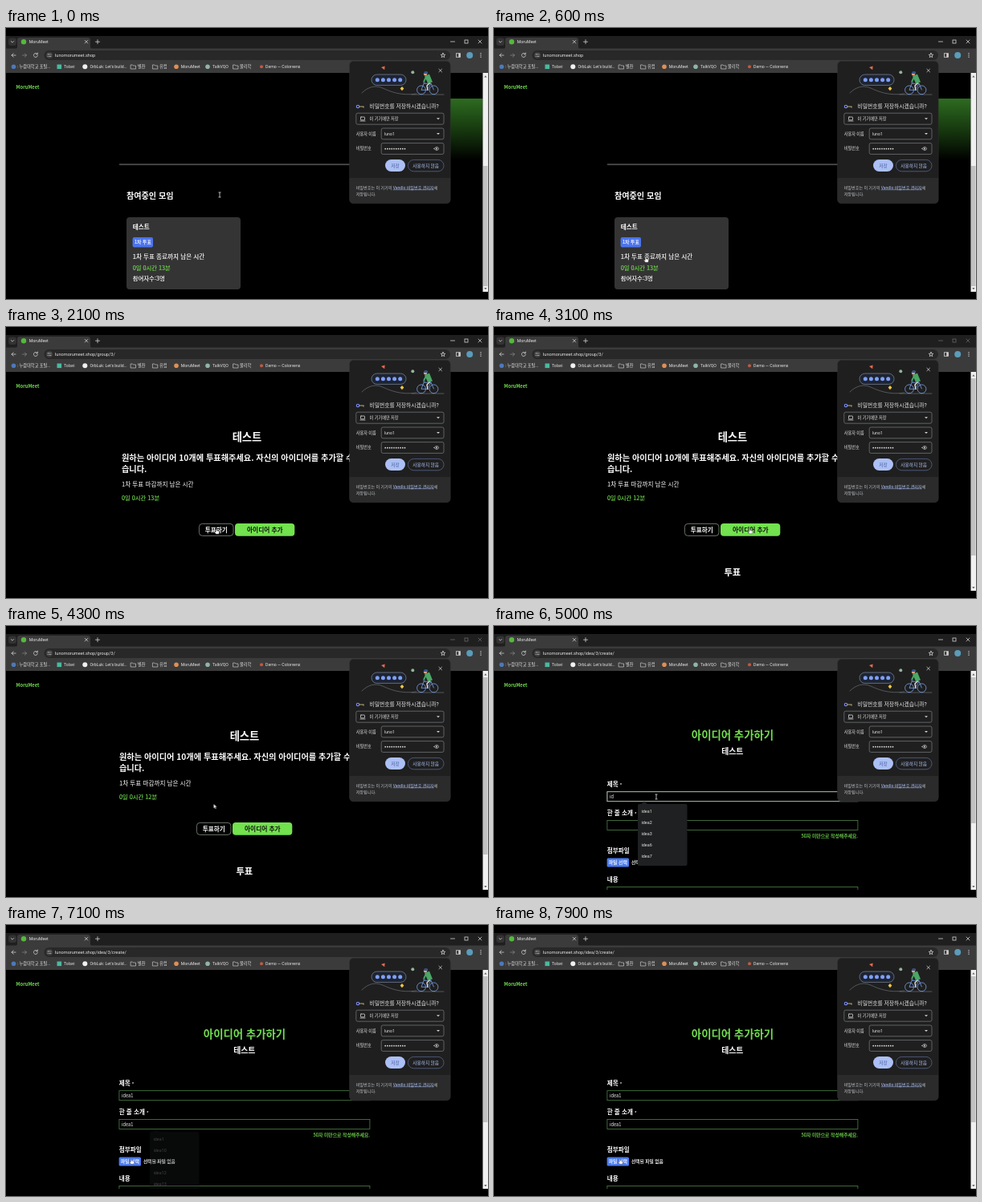
Animation, 600 px wide and 338 px high, one loop 8000 ms. Source, as an HTML page:

```html
<!DOCTYPE html>
<html lang="ko">
<head>
<meta charset="utf-8">
<title>MoruMeet</title>
<style>
html, body { margin: 0; width: 100%; height: 100%; overflow: hidden; background: #000; }
svg { display: block; width: 100vw; height: 100vh; }
text { font-family: "Noto Sans CJK KR", "Noto Sans CJK", "Noto Sans", sans-serif; fill: #fff; white-space: pre; }
.ui text, .latin { font-family: Roboto, "Noto Sans CJK KR", "Noto Sans CJK", sans-serif; fill: #e3e3e3; }
.page text { stroke: #fff; stroke-width: .15; }
.page .g { fill: #72dd50; stroke: #72dd50; }
.page .b, .page .t1, .page .t2, .page .latin { stroke: none; }
.b { font-weight: 700; }
.mid { text-anchor: middle; }
.line { fill: none; stroke: #d0d0d0; stroke-width: .8; stroke-linecap: round; }
.box { fill: none; stroke: #7c7e81; stroke-width: .7; }
.field { fill: #000; stroke: #4f8248; stroke-width: .8; }
.focus { fill: none; stroke: #b4b4b4; stroke-width: .9; }
.list { fill: #1f2021; }
.thumb { fill: #c1c1c1; }

/* One 8 s loop; every rule below shares it. */
.home, .group, .vote, .create, .dim, .bright, .title-on, .title-list, .intro-on, .intro-list,
.caret, .all, .match, .cursor, .beam, .arrow, .hand, .t1 tspan, .t2 tspan {
  animation: 8s infinite step-end backwards;
}
.home { animation-name: home; }
.group { animation-name: group; }
.vote, .dim { animation-name: vote; }
.create { animation-name: create; }
.bright { animation-name: bright; }
.title-on { animation-name: title-on; }
.title-list { animation-name: title-list; }
.intro-on { animation-name: intro-on; }
.intro-list { animation-name: intro-list; animation-timing-function: linear; }
.caret { animation-name: caret; }
.all { animation-name: all; }
.match { animation-name: match; }
.t1 tspan { animation-name: type1; }
.t2 tspan { animation-name: type2; }
tspan:nth-child(2) { animation-delay: .08s; }
tspan:nth-child(3) { animation-delay: .16s; }
tspan:nth-child(4) { animation-delay: .24s; }
tspan:nth-child(5) { animation-delay: .32s; }
.cursor { animation-name: move; animation-timing-function: ease-in-out; }
.beam { animation-name: beam; }
.arrow { animation-name: arrow; }
.hand { animation-name: hand; }

@keyframes home { 0% { visibility: visible } 8.75%, 100% { visibility: hidden } }
@keyframes group { 0% { visibility: hidden } 8.75% { visibility: visible } 28.75%, 100% { visibility: hidden } }
@keyframes vote { 0% { visibility: hidden } 28.75% { visibility: visible } 56.25%, 100% { visibility: hidden } }
@keyframes create { 0% { visibility: hidden } 56.25%, 100% { visibility: visible } }
@keyframes bright { 0% { visibility: visible } 28.75% { visibility: hidden } 56.25%, 100% { visibility: visible } }
@keyframes title-on { 0% { opacity: 0 } 59.4% { opacity: 1 } 70%, 100% { opacity: 0 } }
@keyframes title-list { 0% { opacity: 0 } 60% { opacity: 1 } 67%, 100% { opacity: 0 } }
@keyframes intro-on { 0% { opacity: 0 } 70% { opacity: 1 } 88%, 100% { opacity: 0 } }
@keyframes intro-list { 0%, 70.5% { opacity: 0 } 70.6%, 87.4% { opacity: 1 } 89.3%, 100% { opacity: 0 } }
@keyframes caret { 0% { opacity: 0 } 70% { opacity: 1 } 77.5%, 100% { opacity: 0 } }
@keyframes all { 0% { opacity: 1 } 81.5%, 100% { opacity: 0 } }
@keyframes match { 0% { opacity: 0 } 81.5%, 100% { opacity: 1 } }
@keyframes type1 { 0% { fill-opacity: 0 } 61.5%, 100% { fill-opacity: 1 } }
@keyframes type2 { 0% { fill-opacity: 0 } 77.5%, 100% { fill-opacity: 1 } }
@keyframes move {
  0%, 1.25% { transform: translate(266px, 208px) }
  6.25%, 17.5% { transform: translate(189px, 287px) }
  24%, 31% { transform: translate(262px, 253px) }
  36%, 46% { transform: translate(318.5px, 252.5px) }
  51%, 54% { transform: translate(258.5px, 222px) }
  56%, 56.5% { transform: translate(306px, 252px) }
  59%, 67.5% { transform: translate(202px, 213px) }
  70%, 83.5% { transform: translate(202.5px, 250.5px) }
  87.5% { transform: translate(156px, 293px) }
  97%, 100% { transform: translate(157px, 293px) }
}
@keyframes beam { 0% { visibility: visible } 4% { visibility: hidden } 58.5% { visibility: visible } 85.5%, 100% { visibility: hidden } }
@keyframes arrow {
  0% { visibility: hidden } 8.75% { visibility: visible } 23% { visibility: hidden }
  31.5% { visibility: visible } 35% { visibility: hidden } 48% { visibility: visible }
  55.6% { visibility: hidden } 56.6% { visibility: visible } 58.5%, 100% { visibility: hidden }
}
@keyframes hand {
  0% { visibility: hidden } 4% { visibility: visible } 8.75% { visibility: hidden }
  23% { visibility: visible } 31.5% { visibility: hidden } 35% { visibility: visible }
  48% { visibility: hidden } 55.6% { visibility: visible } 56.6% { visibility: hidden }
  85.5%, 100% { visibility: visible }
}
</style>
</head>
<body>
<svg viewBox="0 0 600 338" preserveAspectRatio="none">
  <defs>
    <linearGradient id="glow" x1="0" y1="0" x2="0" y2="1">
      <stop offset="0" stop-color="#2d6b20"/><stop offset=".5" stop-color="#17390f"/><stop offset="1" stop-color="#000"/>
    </linearGradient>
    <clipPath id="view"><rect y="56" width="600" height="273"/></clipPath>
    <path id="folder" class="line" style="stroke-width:.65" d="M-3-2h2l1 1h3v4h-6z"/>
    <path id="down" d="M-2-1h4l-2 2z" fill="#d5d5d5"/>
    <path id="x" class="line" d="M-1.8-1.8l3.6 3.6m0-3.6l-3.6 3.6"/>
    <g id="controls">
      <path class="line" d="M553.5 17h5M588 15l4 4m0-4l-4 4"/>
      <rect class="line" x="571" y="15" width="4" height="4"/>
    </g>
    <g id="track">
      <rect x="593.5" y="56" width="6.5" height="273" fill="#f0f0f0"/>
      <path d="M595.2 61.5h3.4l-1.7-2.2zM595.2 324h3.4l-1.7 2.2z" fill="#606060"/>
    </g>
    <g id="vote-head">
      <text class="g b mid" x="297" y="141.5" font-size="13.3">테스트</text>
      <text class="b" x="141" y="166.5" font-size="10.2">원하는 아이디어 10개에 투표해주세요. 자신의 아이디어를 추가할 수도 있</text>
      <text class="b" x="141" y="181" font-size="10.2">습니다.</text>
      <text x="141" y="199" font-size="7.6">1차 투표 마감까지 남은 시간</text>
      <rect x="237.4" y="245.4" width="42.6" height="15" rx="4" fill="#000" stroke="#829080" stroke-width=".8"/>
      <text class="g b mid" x="258.8" y="255.7" font-size="7.6">투표하기</text>
      <rect x="282" y="245" width="74.3" height="15.8" rx="4" fill="#72e24e"/>
      <text class="b mid" x="319.3" y="255.8" font-size="7.7" style="fill:#101510">아이디어 추가</text>
    </g>
  </defs>

  <rect width="600" height="338"/>

  <g class="page" clip-path="url(#view)">
    <g class="home">
      <rect x="440" y="88" width="153.5" height="77" fill="url(#glow)"/>
      <rect x="141" y="169.3" width="312" height="1.8" fill="#4b4b4b"/>
      <text class="b" x="150" y="213.3" font-size="10.1">참여중인 모임</text>
      <rect x="150" y="236" width="142" height="90" rx="4" fill="#343434"/>
      <text class="b" x="157.7" y="251" font-size="7.6">테스트</text>
      <rect x="157.6" y="261" width="25.4" height="12.4" rx="2" fill="#4b74ee"/>
      <text class="mid" x="170.3" y="269.3" font-size="5.8">1차 투표</text>
      <text x="157.7" y="288.3" font-size="7.6">1차 투표 종료까지 남은 시간</text>
      <text class="g" x="157.7" y="301.8" font-size="7.3">0일 0시간 13분</text>
      <text x="157.7" y="315.3" font-size="7.4">참여자수:3명</text>
      <use href="#track"/><rect class="thumb" x="594" y="172" width="5.5" height="150"/>
    </g>

    <g class="group" transform="translate(3)">
      <use href="#vote-head"/>
      <text class="g" x="141" y="216.3" font-size="7.3">0일 0시간 13분</text>
    </g>

    <g class="vote">
      <use href="#vote-head"/>
      <text class="g" x="141" y="216.3" font-size="7.3">0일 0시간 12분</text>
      <text class="b mid" x="296.8" y="310.2" font-size="11.3">투표</text>
      <use href="#track"/><rect class="thumb" x="594" y="64" width="5.5" height="221"/>
    </g>

    <g class="create">
      <text class="g b mid" x="297" y="141.3" font-size="13.4">아이디어 추가하기</text>
      <text class="b mid" x="296.8" y="159.6" font-size="9.9">테스트</text>
      <g font-size="7.6">
        <text class="b" x="140.7" y="200.3">제목 <tspan font-size="5">*</tspan></text>
        <text class="b" x="140.7" y="236.2">한 줄 소개 <tspan font-size="5">*</tspan></text>
        <text class="b" x="140.7" y="283.3">첨부파일</text>
        <text class="b" x="140.7" y="319">내용</text>
      </g>
      <rect class="field" x="140.9" y="206.7" width="312" height="12"/>
      <rect class="field" x="140.9" y="242.5" width="312" height="12"/>
      <rect class="field" x="140.9" y="325.4" width="312" height="30"/>
      <rect class="focus title-on" x="140.9" y="206.7" width="312" height="12"/>
      <rect class="focus intro-on" x="140.9" y="242.5" width="312" height="12"/>
      <path class="caret" d="M144.3 245.5v6" stroke="#ddd" stroke-width=".6"/>
      <text class="t1" x="144" y="214.8" font-size="5.6"><tspan>i</tspan><tspan>d</tspan><tspan>e</tspan><tspan>a</tspan><tspan>1</tspan></text>
      <text class="t2" x="144" y="250.6" font-size="5.6"><tspan>i</tspan><tspan>d</tspan><tspan>e</tspan><tspan>a</tspan><tspan>1</tspan></text>
      <text class="g" x="453" y="264.2" font-size="5.85" text-anchor="end">50자 미만으로 작성해주세요.</text>
      <rect x="140.6" y="289.5" width="27.4" height="11" rx="1.5" fill="#4a7bf0"/>
      <text class="mid" x="154.3" y="297.2" font-size="5.9">파일 선택</text>
      <text x="171" y="297.2" font-size="5.7">선택된 파일 없음</text>
      <use href="#track"/><rect class="thumb" x="594" y="64" width="5.5" height="182"/>

      <g class="title-list">
        <path class="list" d="M183 222.5l4-4 4 4z"/>
        <rect class="list" x="179" y="222" width="61.5" height="77" rx="2"/>
        <g font-size="5.4" transform="translate(183.5 -36)">
          <text class="latin" y="269">idea1</text><text class="latin" y="283">idea2</text><text class="latin" y="297">idea3</text>
          <text class="latin" y="311">idea6</text><text class="latin" y="325">idea7</text>
        </g>
      </g>
      <g class="intro-list">
        <path class="list" d="M183 258.5l4-4 4 4z"/>
        <rect class="list" x="179" y="258" width="61.5" height="77" rx="2"/>
        <g font-size="5.4" transform="translate(183.5)">
          <text class="latin" y="269">idea1</text>
          <g class="all">
            <text class="latin" y="283">idea2</text><text class="latin" y="297">idea3</text>
            <text class="latin" y="311">idea6</text><text class="latin" y="325">idea7</text>
          </g>
          <g class="match">
            <text class="latin" y="283">idea10</text><text class="latin" y="297">idea11</text>
            <text class="latin" y="311">idea12</text><text class="latin" y="325">idea13</text>
          </g>
        </g>
      </g>
    </g>
    <text class="g b" x="12.6" y="76.2" font-size="5.8">MoruMeet</text>
  </g>

  <!-- browser window -->
  <g class="ui" font-size="5.2">
    <rect y="10" width="600" height="17" fill="#1f1f1f"/>
    <rect y="25.5" width="600" height="30.5" fill="#3b3b3b"/>
    <path d="M12 26q2 0 2-3v-8q0-3 3-3h85q3 0 3 3v8q0 3 2 3z" fill="#3b3b3b"/>
    <rect x="3" y="12.5" width="10" height="9.5" rx="3" fill="#333"/>
    <path class="line" d="M6.3 16.5l1.7 1.7 1.7-1.7"/>
    <circle cx="22" cy="17.2" r="3.2" fill="#55b83c"/>
    <text x="28.8" y="19.1">MoruMeet</text>
    <use href="#x" x="100" y="17.2"/>
    <path class="line" d="M111.5 17.2h5m-2.5-2.5v5"/>
    <use class="bright" href="#controls"/>
    <g class="dim"><use href="#controls" opacity=".4"/></g>

    <path class="line" d="M12 34H7m2.2-2.2L7 34l2.2 2.2"/>
    <path class="line" opacity=".45" d="M20.5 34h5m-2.2-2.2l2.2 2.2-2.2 2.2"/>
    <path class="line" d="M39 32.5a2.5 2.5 0 1 0 .4 2M39.3 31v1.8h-1.8"/>
    <rect x="47.5" y="28" width="505.5" height="12" rx="6" fill="#282828"/>
    <circle cx="54" cy="34" r="4.3" fill="#3d3d3d"/>
    <path class="line" d="M52 32.8h2.2m1.5 0h.3M52 35.3h.3m1.5 0h2.2"/>
    <g font-size="5.6">
      <text class="home" x="61" y="36">lunomorumeet.shop</text>
      <text class="group" x="61" y="36">lunomorumeet.shop/group/3/</text>
      <text class="vote" x="61" y="36">lunomorumeet.shop/group/3/</text>
      <text class="create" x="61" y="36">lunomorumeet.shop/idea/3/create/</text>
    </g>
    <path class="line" d="M544 31.3l.8 1.9 2 .1-1.6 1.3.6 2-1.8-1.1-1.8 1.1.6-2-1.6-1.3 2-.1z"/>
    <rect class="line" x="560.5" y="31.7" width="5" height="4.6"/><path d="M563.3 31.7h2.2v4.6h-2.2z" fill="#d0d0d0"/>
    <circle cx="577.2" cy="34" r="4" fill="#5a9cbb"/>
    <g fill="#d0d0d0"><circle cx="591" cy="31.8" r=".7"/><circle cx="591" cy="34" r=".7"/><circle cx="591" cy="36.2" r=".7"/></g>

    <circle cx="9.5" cy="48.3" r="2.8" fill="#4d79b8"/>
    <text x="14" y="50.3">: 누람대학교 포털...</text>
    <rect x="63.5" y="45.5" width="5.6" height="5.6" fill="#49b9a0"/>
    <text x="72" y="50.3">Tolavi</text>
    <circle cx="98.3" cy="48.3" r="3" fill="#f0f0f0"/>
    <text x="104.5" y="50.3">OrbLuk: Let's build...</text>
    <use href="#folder" x="158.5" y="48"/><text x="164" y="50.3">별찬</text>
    <use href="#folder" x="185.8" y="48"/><text x="191" y="50.3">유럽</text>
    <circle cx="212" cy="48.3" r="2.8" fill="#df8f55"/>
    <text x="217.8" y="50.3">MoruMeet</text>
    <circle cx="251" cy="48.3" r="2.8" fill="#8fb5a8"/>
    <text x="257" y="50.3">TalkVQO</text>
    <use href="#folder" x="286" y="48"/><text x="291" y="50.3">물리학</text>
    <circle cx="318" cy="48.3" r="2" fill="#c25a42"/>
    <text x="323" y="50.3">Demo — Colorvens</text>
  </g>

  <!-- password prompt -->
  <g class="ui" font-size="5.2">
    <rect x="427.6" y="41.3" width="125.6" height="177.5" rx="5" fill="#1f1f1f" stroke="#343434" stroke-width=".5"/>
    <path d="M427.6 187h125.6v27q0 4.8-5 4.8H432.6q-5 0-5-4.8z" fill="#2b2b2c"/>
    <use href="#x" x="540.7" y="53"/>
    <path class="line" style="stroke:#777b80;stroke-width:.6" d="M443 81c8-8 17-10 26-6s22 10 42 7M505 83h40"/>
    <rect x="455" y="58" width="43" height="13.4" rx="6.7" fill="#1d2433" stroke="#747d8d" stroke-width=".8"/>
    <path d="M462.3 64.7h29" stroke="#7f9ff7" stroke-width="5" stroke-linecap="round" stroke-dasharray="0 7.1"/>
    <path d="M467 49l4.6-1.5-.4 4.8z" fill="#e76a50"/>
    <circle cx="506.3" cy="55.2" r="2" fill="#91b59a"/>
    <path d="M493 73l2.4 2.6-2.4 2.6-2.4-2.6z" fill="#f2c746"/>
    <g fill="none" stroke="#7da4ee" stroke-width=".8">
      <circle cx="517" cy="77.3" r="5.4"/><circle cx="532.5" cy="77.3" r="5.4"/>
      <path d="M517 77.3l3-8h9l-5 8zM529 69l3.5 8.3M519 68h3"/>
    </g>
    <path d="M528 68l-4 4 1 6" fill="none" stroke="#d8d8d8" stroke-width="1.5"/>
    <path d="M521 60l6-2.5 4 10-6 1.5z" fill="#4ba765"/>
    <path d="M523 61l-3 6" stroke="#4ba765" stroke-width="1.8"/>
    <circle cx="522" cy="57.4" r="2.1" fill="#dba083"/><path d="M519.8 57q0-3 3-3t2.3 3z" fill="#39558a"/>

    <circle cx="438" cy="98" r="1.7" fill="none" stroke="#7f8ff7" stroke-width="1.1"/>
    <path d="M439.8 98h5.2v1.5" fill="none" stroke="#b7b184" stroke-width="1.1"/>
    <text x="452.6" y="100.4" font-size="6.8">비밀번호를 저장하시겠습니까?</text>
    <rect class="box" x="435.8" y="106.2" width="109.2" height="14" rx="2"/>
    <rect class="line" x="441.5" y="111" width="5" height="3.8" rx=".5"/><path class="line" d="M441 116h6"/>
    <text x="452.6" y="115.1">이 기기에만 저장</text>
    <use href="#down" x="538" y="113.3"/>
    <text x="435.7" y="133.6">사용자 이름</text>
    <rect class="box" x="467.2" y="125" width="77.8" height="13.8" rx="2"/>
    <text x="471" y="133.7">luno1</text>
    <use href="#down" x="538" y="132"/>
    <text x="435.7" y="152.4">비밀번호</text>
    <rect class="box" x="467.2" y="143.6" width="77.8" height="13.8" rx="2"/>
    <path d="M472.2 150.7h25" stroke="#e3e3e3" stroke-width="1.7" stroke-linecap="round" stroke-dasharray="0 2.7"/>
    <path class="line" d="M533 150.5q3-4 6 0-3 4-6 0z"/><circle cx="536" cy="150.5" r="1" fill="#d0d0d0"/>
    <rect x="472" y="164" width="25" height="15" rx="7.5" fill="#acc0f5"/>
    <text class="mid" x="484.5" y="173.5" font-size="5.7" style="fill:#4a60a0">저장</text>
    <rect x="500.4" y="164.4" width="44.6" height="14.4" rx="7.2" fill="none" stroke="#56658c" stroke-width=".8"/>
    <text class="mid" x="522.7" y="173.5" font-size="5.7" style="fill:#acc0f5">사용하지 않음</text>
    <g font-size="5.1">
      <text x="435.7" y="200.6" style="fill:#bfc2c5">비밀번호는 이 기기의 <tspan style="fill:#acc0f5;text-decoration:underline">Vandlo 비밀번호 관리자</tspan>에</text>
      <text x="435.7" y="208.6" style="fill:#bfc2c5">저장됩니다.</text>
    </g>
  </g>

  <g class="cursor">
    <path class="beam" d="M-1.5-3h3M0-3v6M-1.5 3h3" fill="none" stroke="#ddd" stroke-width=".8"/>
    <path class="arrow" d="M0 0v5.4l1.3-1.2.9 2 1-.5-.9-1.9h1.7z" fill="#fff" stroke="#222" stroke-width=".35"/>
    <path class="hand" d="M-.8-1q.7-.9 1.3 0v2l2.3.5q.8.3.7 1.2l-.5 2.6H-.5l-2-2.6q0-1.1 1.7 0z" fill="#fff" stroke="#222" stroke-width=".4"/>
  </g>
</svg>
</body>
</html>
```
